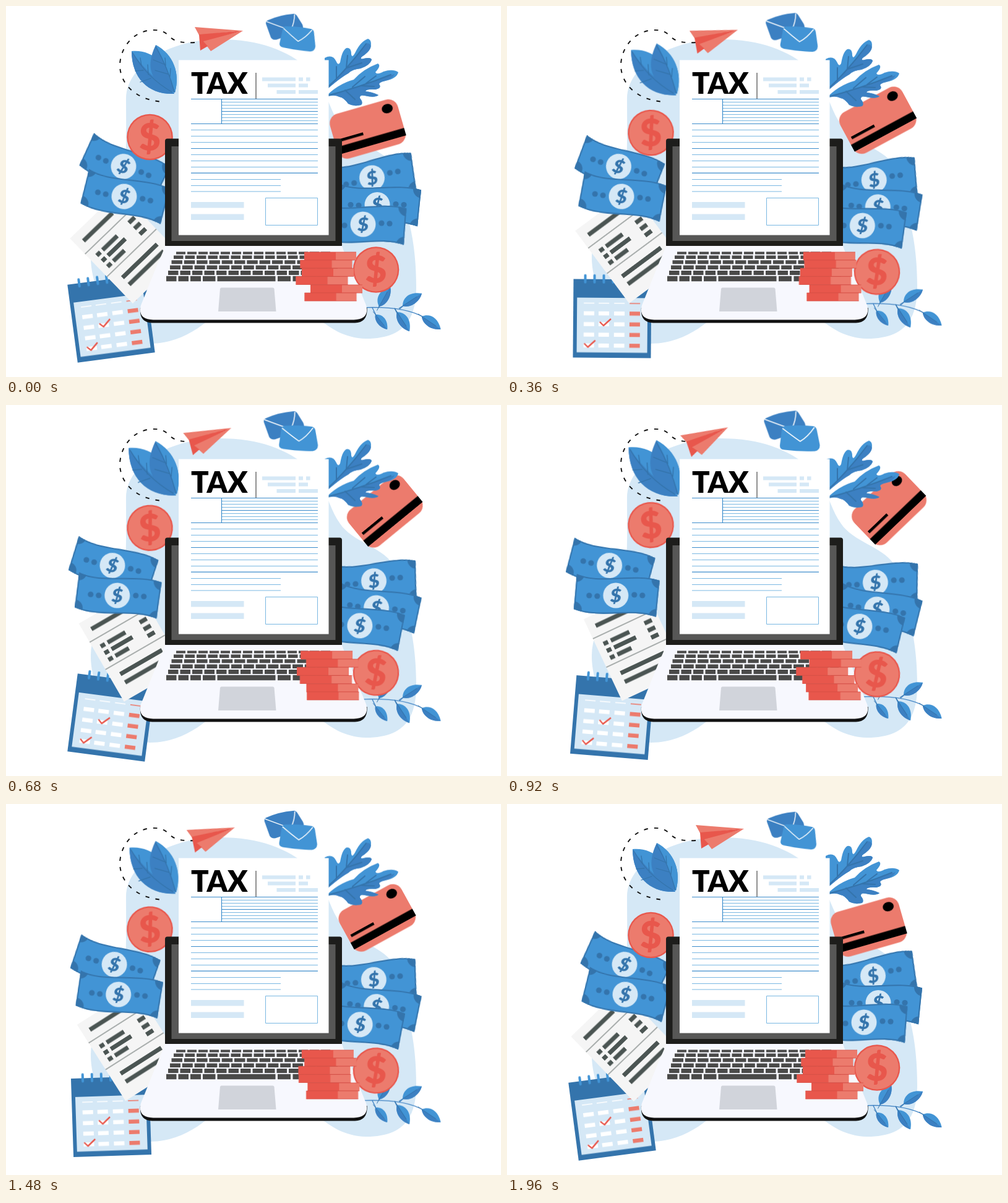
Write an HTML page without scripts that moves like this. It is 800x600 px and loops after 2 s.

```html
<!DOCTYPE html>
<html lang="en">
<head>
<meta charset="utf-8">
<title>Tax time</title>
<style>
html, body { margin: 0; width: 100%; height: 100%; overflow: hidden; background: #fff; }
svg { display: block; width: 100vw; height: 100vh; }
text { font-family: Lato, "Open Sans", sans-serif; font-weight: 900; }
.pale { fill: #d5e8f6; }
.blue { fill: #4294d5; }
.mid { fill: #3c80c2; }
.deep { fill: #3474ac; }
.rose { fill: #ec7b6d; }
.red { fill: #e8574c; }
.line { fill: none; stroke-linejoin: round; }
.vein { fill: none; stroke: #3474ac; stroke-linecap: round; }

/* each part swings out to --b and back; the number is the turning point */
.p34, .p43, .p49, .p53, .p56 { animation: 2s linear infinite; }
.p34 { animation-name: p34; }
.p43 { animation-name: p43; }
.p49 { animation-name: p49; }
.p53 { animation-name: p53; }
.p56 { animation-name: p56; }
@keyframes p34 { 0%, 98%, 100% { transform: none } 34% { transform: var(--b) } }
@keyframes p43 { 0%, 98%, 100% { transform: none } 43% { transform: var(--b) } }
@keyframes p49 { 0%, 98%, 100% { transform: none } 49% { transform: var(--b) } }
@keyframes p53 { 0%, 98%, 100% { transform: none } 53% { transform: var(--b) } }
@keyframes p56 { 0%, 98%, 100% { transform: none } 56% { transform: var(--b) } }
</style>
</head>
<body>
<svg viewBox="0 0 800 600">
<defs>
  <path id="note" d="M-63-35C-26-18 29-38 71-24L65 35C24 20-26 39-68 22Z"/>
  <clipPath id="noteClip"><use href="#note"/></clipPath>
  <g id="bill">
    <use href="#note" class="blue"/>
    <g clip-path="url(#noteClip)">
      <g class="deep">
        <circle cx="-64" cy="-36" r="14"/><circle cx="72" cy="-25" r="14"/>
        <circle cx="66" cy="36" r="14"/><circle cx="-69" cy="23" r="14"/>
      </g>
      <use href="#note" fill="none" stroke="#3474ac" stroke-width="4"/>
    </g>
    <g class="deep">
      <circle cx="-43" r="4.6"/><circle cx="-30" cy="1" r="4.6"/>
      <circle cx="30" cy="-1" r="4.6"/><circle cx="43" r="4.6"/>
    </g>
    <circle r="20.5" class="pale"/>
    <text y="10.5" font-size="31" font-style="italic" text-anchor="middle" class="deep">$</text>
  </g>
  <g id="coin">
    <circle r="37.3" class="red"/>
    <circle r="35" class="rose"/>
    <text y="20.5" font-size="60" text-anchor="middle" class="red">$</text>
  </g>
  <g id="leaf">
    <path class="blue" d="M0 0C7-11 22-14 37 0C26 10 8 10 0 0Z"/>
    <path class="mid" d="M0 0H37C26 10 8 10 0 0Z"/>
    <path class="vein" d="M-7 0H27"/>
  </g>
  <g id="stack">
    <path class="rose" d="M0 0H84V13H0Z"/>
    <path class="red" d="M0 0H51V13H0Z"/>
    <path fill="none" stroke="#d64f45" stroke-width=".8" d="M0 0H84M0 13H84"/>
  </g>
  <g id="days">
    <path fill="#fff" d="M124 0h17v6.5h-17zM148 0h17v6.5h-17zM173 0h17v6.5h-17z"/>
    <path class="rose" d="M198 0h17v6.5h-17z"/>
  </g>
  <path id="tick" class="line" stroke="#e8574c" stroke-width="2.4" d="M0 5L6 11L18 0"/>
</defs>

<!-- backdrop -->
<path class="pale" d="M194 150C194 98 262 54 345 54C410 54 455 72 490 102C515 122 520 165 540 192C560 222 610 230 627 260C640 286 642 318 652 352C660 385 663 420 663 455C663 510 640 538 582 538C545 537 525 520 510 510H325C300 530 270 546 232 546C190 540 136 470 137 405C138 350 178 330 188 285C196 250 194 200 194 150Z"/>
<path class="line" stroke="#111" stroke-width="1.9" stroke-dasharray="6.5 10" d="M305 59C285 60 273 58 264 49C256 40 244 37 228 40C200 46 184 72 184 97C185 128 212 153 255 155"/>

<!-- paper plane -->
<g class="p49" style="--b:translate(-27px,6px) rotate(-15deg);transform-origin:344px 37px">
  <path class="rose" d="M305 34L383 40L312 47ZM383 40L331 73L318 56Z"/>
  <path class="red" d="M312 46L383 40L319 57L326 65L314 72Z"/>
</g>

<!-- envelopes -->
<g class="p49" style="--b:scale(1.12);transform-origin:461px 42px">
  <g transform="translate(461 42) scale(.89) translate(-461 -42)">
    <path class="mid" d="M420 20Q440 11 464 9Q468 8 471 12L481 28Q484 34 481 40L434 56Q427 57 424 52L415 27Q414 22 420 20Z"/>
    <path class="line" stroke="#fff" stroke-width="1.6" d="M416 23Q440 32 460 39Q467 25 467 10"/>
    <g class="p49" style="--b:rotate(-6deg);transform-origin:474px 54px">
      <g transform="rotate(6 474 54)">
        <path class="blue" d="M449 34Q474 32 495 34Q500 35 501 40L506 64Q507 73 498 75Q474 76 448 73Q440 72 441 65L444 39Q445 35 449 34Z"/>
        <path class="line" stroke="#fff" stroke-width="1.6" d="M445 38Q462 51 474 59Q486 52 497 36"/>
      </g>
    </g>
  </g>
</g>

<!-- left leaves -->
<g class="p49" style="--b:scale(1.16);transform-origin:246px 104px">
  <path class="blue" d="M203 73C236 70 262 92 272 142C232 144 203 118 203 73Z"/>
  <path class="mid" d="M203 73C218 96 240 118 272 142C232 144 203 118 203 73Z"/>
  <path class="mid" d="M242 63C232 84 230 102 240 117C250 130 262 136 273 140C282 108 270 78 242 63Z"/>
  <path class="blue" d="M242 63C270 78 282 108 273 140C266 116 256 88 242 63Z"/>
  <path class="vein" stroke-width="1.3" d="M242 66Q262 100 272 139M258 96L257 84M265 114L266 101M255 94L238 87M262 110L241 104M205 76Q228 116 268 139M219 97L217 84M230 111L229 95M222 104L209 105M234 117L217 123"/>
</g>

<!-- bank card -->
<g class="p43" style="--b:translate(35px,-34px) rotate(-29.5deg);transform-origin:584.5px 199px">
  <g transform="translate(584.5 199) rotate(-16)">
    <rect class="rose" x="-57" y="-37.5" width="114" height="75" rx="16"/>
    <path d="M-57 14.5H57V27H-57ZM-51 3H-9V7.5H-51Z"/>
    <ellipse cx="39.5" cy="-23" rx="9" ry="7.5"/>
  </g>
</g>

<!-- right leaves -->
<g class="p49" style="--b:translate(0,5px)">
  <path class="blue" d="M515 138V84Q528 77 534 90Q537 97 540 91Q543 72 550 68Q558 66 558 78Q559 85 564 76Q573 57 585 53Q592 55 589 68Q586 75 575 82Q571 87 578 85Q590 82 591 87Q588 96 573 101Q560 102 553 109Q540 116 515 138Z"/>
  <path class="mid" d="M515 138L584 60Q592 62 589 68Q586 75 575 82Q571 87 578 85Q590 82 591 87Q588 96 573 101Q560 102 553 109Q540 116 515 138Z"/>
  <path class="vein" stroke-width="2" d="M518 133Q550 104 582 61M534 117V98M550 100L552 80M551 100L575 92"/>
  <path class="blue" d="M515 148Q536 126 562 119Q577 102 601 93Q607 96 597 107Q599 112 610 106Q625 101 634 107Q632 117 613 121Q600 124 604 128Q607 133 597 135Q582 134 581 138Q592 139 602 144Q596 149 580 145Q571 143 572 149Q578 156 574 160Q562 163 553 158Q546 148 539 147Q530 142 515 148Z"/>
  <path class="mid" d="M515 147Q570 130 628 110Q624 118 613 121Q600 124 604 128Q607 133 597 135Q582 134 581 138Q592 139 602 144Q596 149 580 145Q571 143 572 149Q578 156 574 160Q562 163 553 158Q546 148 539 147Q530 142 515 147Z"/>
  <path class="vein" stroke-width="2" d="M515 146Q570 132 622 111M560 131L580 114M582 125L598 113M548 136L564 151M574 129L595 130"/>
</g>

<!-- calendar -->
<g class="p34" style="--b:rotate(15deg);transform-origin:170px 505.5px">
  <g transform="rotate(-7.5 170 505.5)">
    <path class="deep" d="M107 442H233V569H107Z"/>
    <path class="pale" d="M113 472H227V560.5H113Z"/>
    <path class="line" stroke="#4294d5" stroke-width="4" stroke-linecap="round" d="M126 436V447M141 436V447M156 436V447M171 436V447"/>
    <path fill="#fff" d="M124 480h17v1.6h-17zM148 480h17v1.6h-17zM173 480h17v1.6h-17z"/>
    <path class="rose" d="M198 480h17v1.6h-17z"/>
    <use href="#days" y="494"/><use href="#days" y="511.5"/>
    <use href="#days" y="528.5"/><use href="#days" y="546"/>
    <use href="#tick" x="150" y="506"/><use href="#tick" x="125" y="541"/>
  </g>
</g>

<!-- printed sheet -->
<g class="p53" style="--b:rotate(21.7deg);transform-origin:203px 423px">
  <g transform="rotate(-44 203 423)">
    <path fill="#f5f5f5" d="M164 320H275V466H164Z"/>
    <path fill="none" stroke="#4b5553" stroke-width=".9" d="M164 355H275M164 406H275"/>
    <path fill="none" stroke="#4b5553" stroke-width="7" d="M177 338H242M176 370h8M189 370h33M176 382.5h8M189 382.5h39M176 395h8M189 395h25M250 368h13M250 381h13M250 393.5h13M181 424.5h78M181 440h78"/>
  </g>
</g>

<!-- left notes and coin -->
<g class="p53" style="--b:translate(-28px) rotate(-11.5deg);transform-origin:190px 259.5px">
  <use href="#bill" transform="translate(190 259.5) rotate(19.5)"/>
</g>
<g class="p53" style="--b:translate(-17.5px) rotate(-10.5deg);transform-origin:191px 308px">
  <use href="#bill" transform="translate(191 308) rotate(9)"/>
</g>
<g class="p49" style="--b:translate(0,-19px) rotate(-8deg);transform-origin:232.5px 212px"><use href="#coin" x="232.5" y="212"/></g>

<!-- right notes -->
<g class="p56" style="--b:rotate(11deg);transform-origin:537px 307px">
  <use href="#bill" transform="translate(591.5 278) rotate(-14)"/>
</g>
<g class="p56" style="--b:rotate(10deg);transform-origin:537px 311px">
  <use href="#bill" transform="translate(600 321.5)"/>
</g>
<g class="p56" style="--b:rotate(11.5deg);transform-origin:543px 313px">
  <use href="#bill" transform="translate(577 353) rotate(-1.5)"/>
</g>

<!-- twig -->
<g class="p49" style="--b:translate(0,-17px)">
  <path class="line" stroke="#3c80c2" stroke-width="1.3" d="M570 488C610 486 650 488 676 504M592 488L598 500M628 489L633 499M636 490L643 484M603 488V484"/>
  <use href="#leaf" transform="translate(672 502) rotate(34)"/>
  <use href="#leaf" transform="translate(641 485) rotate(-33)"/>
  <use href="#leaf" transform="translate(632 495) rotate(57)"/>
  <use href="#leaf" transform="translate(597 499) rotate(51) scale(.83)"/>
  <use href="#leaf" transform="translate(603 486) rotate(-61)"/>
</g>

<!-- laptop -->
<rect x="257" y="214.5" width="286" height="176" rx="4" fill="#1d1d1b"/>
<path fill="#575756" d="M267.5 227H532.5V380H267.5Z"/>
<path fill="#111" d="M217 488Q215 512 236 512.5H564Q585 512 583.5 488Z"/>
<path fill="#f7f8fe" d="M257 388H543Q546 398 553 412L582 484Q588 507 562 507.5H238Q212 507 218 484L247 412Q254 398 257 388Z"/>
<g fill="none" stroke="#4a4a49">
  <path stroke-width="4" stroke-dasharray="15 3" d="M275 399.5H526"/>
  <path stroke-width="5.4" stroke-dasharray="15.5 3" d="M271 406.3H530"/>
  <path stroke-width="6" stroke-dasharray="17.5 2.8" d="M267.5 414.2H533"/>
  <path stroke-width="6.6" stroke-dasharray="17 2.8" d="M265 422.7H536"/>
  <path stroke-width="7" stroke-dasharray="16.5 3" d="M262 431.5H539"/>
  <path stroke-width="8.6" stroke-dasharray="16.5 3 16.5 3 17 3 20.5 3 94 3.5 21 3.5 17 3 17 3 17 3" d="M259 441H541"/>
</g>
<path fill="#d1d4db" d="M348 455.5H431Q433 455.5 433.5 457.5L436.5 494H343L346 457.5Q346.5 455.5 348 455.5Z"/>

<!-- tax form -->
<path fill="#fff" d="M279 87.5H521.5V370.5H279Z"/>
<text x="299" y="142" font-size="47.2">TAX</text>
<path stroke="#222" d="M404 108V151"/>
<path class="pale" d="M414 115.5h54v6h-54zM473 115.5h7v6h-7zM485 115.5h6.5v6h-6.5zM423 125.5h45v6h-45zM473 125.5h15v6h-15zM437.5 136h30.5v6h-30.5zM473 136h31v6h-31zM299 317h85.5v9.5h-85.5zM299 336.5h85.5v9.5h-85.5z"/>
<path fill="none" stroke="#7ab8e2" d="M348.5 155.5H504M348.5 160.5H504M348.5 165.5H504M348.5 175.5H504M348.5 180.5H504M348.5 185.5H504M299 200.5H504M299 210.5H504M299 220.5H504M299 240.5H504M299 250.5H504M299 260.5H504M299 280.5H444M299 290.5H444M299 300H444M419.5 310.5H503.5V354.5H419.5Z"/>
<path fill="none" stroke="#3c8ccb" stroke-width="1.2" d="M299 150.5H504M348.5 150.5V190.5M348.5 170.5H504M299 190.5H504M299 230.5H504M299 270.2H504"/>

<!-- right coin and stacked notes -->
<g class="p49" style="--b:translate(0,9.5px) rotate(8deg);transform-origin:598px 426.5px"><use href="#coin" x="598" y="426.5"/></g>
<g class="p49" style="--b:translate(-8.5px)"><use href="#stack" x="482" y="398"/></g>
<g class="p49" style="--b:translate(14px)"><use href="#stack" x="475.5" y="411"/></g>
<g class="p49" style="--b:translate(-11.5px)"><use href="#stack" x="478" y="424.3"/></g>
<g class="p49" style="--b:translate(9.5px)"><use href="#stack" x="468.5" y="437.5"/></g>
<g class="p49" style="--b:translate(-9.5px)"><use href="#stack" x="492" y="451"/></g>
<g class="p49" style="--b:translate(5.5px)"><use href="#stack" x="482.5" y="464"/></g>
</svg>
</body>
</html>
```
